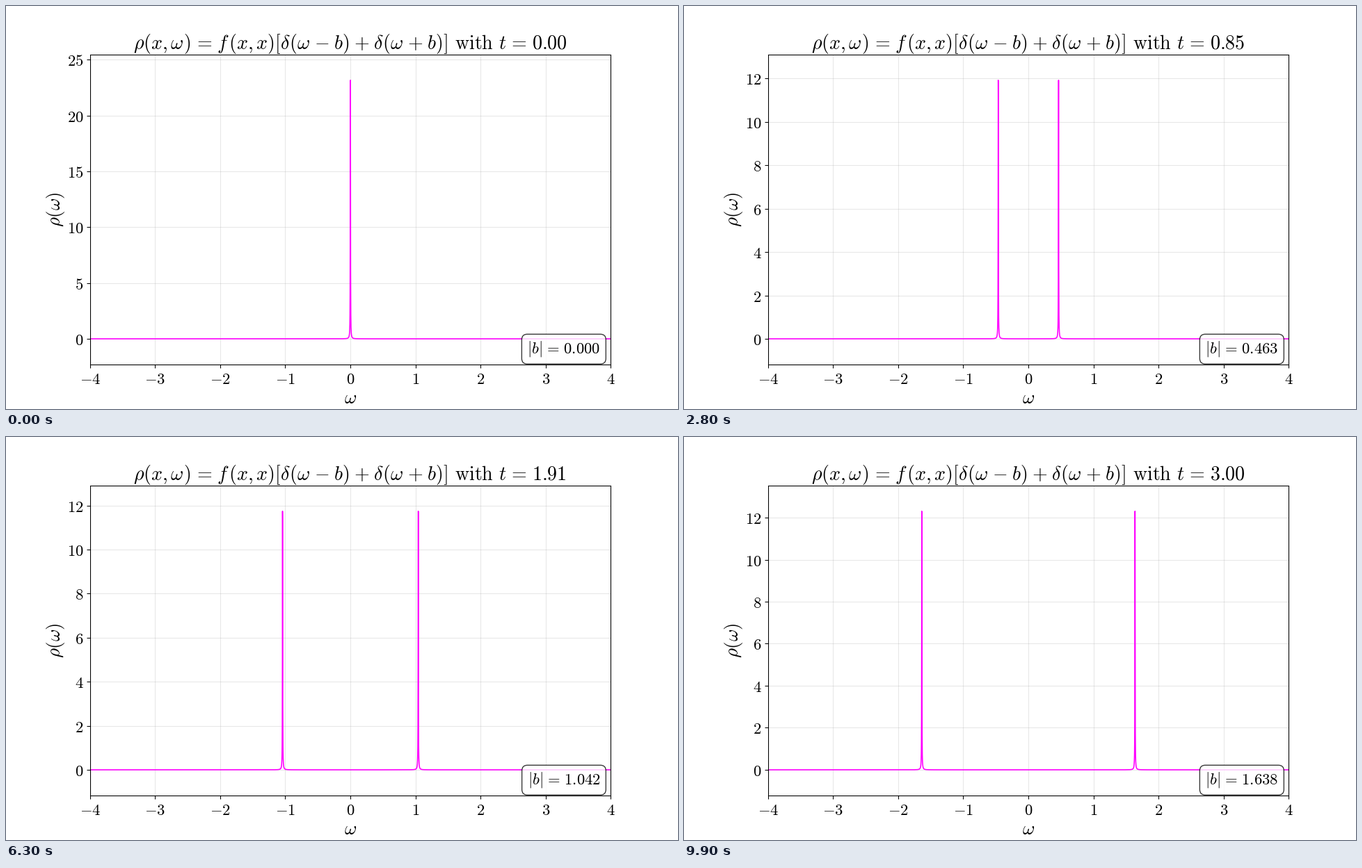
Animation of 966x580 px, one loop 10 s. Source, as a matplotlib script:

```python
import numpy as np
import matplotlib.pyplot as plt
from matplotlib.animation import FuncAnimation

W, H, DPI = 966, 580, 96
FRAMES, T_MAX = 100, 3.0
SPEED = 0.54591      # b = SPEED * t
EPS = 0.002          # half width of a broadened delta
PEAK = 12.306        # height of one delta

plt.rcParams["mathtext.fontset"] = "cm"

omega = np.linspace(-4, 4, 8000)


def lorentz(x):
    return PEAK / (1 + (x / EPS) ** 2)


def sp(width):
    return r"\hspace{%g}" % width


def rel(sym="="):
    return sp(0.116) + sym + sp(0.116)


def binary(sym):
    return sp(0.053) + sym + sp(0.053)


OM = r"\omega" + sp(0.04)
DELTA = r"\delta" + sp(0.04)
TITLE = (
    r"$\rho(x," + OM + ")" + rel() + "f" + sp(0.12) + "(x,x)["
    + DELTA + "(" + OM + binary("-") + "b)" + binary("+")
    + DELTA + "(" + OM + binary("+") + "b)]"
    + sp(0.38) + r"\mathrm{with}" + sp(0.38) + "t" + rel()
)

fig, ax = plt.subplots(figsize=(W / DPI, H / DPI), dpi=DPI)
fig.subplots_adjust(left=0.125, right=0.9, bottom=0.11, top=0.88)


def label(x, y, text, size=20, **kw):
    """Text with its baseline at pixel (x, y), y measured from the top."""
    return fig.text(x / W, 1 - y / H, text, fontsize=size, ha="center",
                    va="baseline", rotation_mode="anchor", **kw)


title = label(494.7, 61.7, "", size=21)
label(495, 572, r"$\omega$")
label(78, 292.9, r"$\rho(\omega)$", rotation=90)

line, = ax.plot([], [], color="magenta", lw=1.2)
ax.grid(alpha=0.3)
ax.set_xlim(-4, 4)
ax.tick_params(labelsize=17)
for axis in (ax.xaxis, ax.yaxis):
    axis.set_major_formatter(lambda v, pos: f"${v:g}$")

box = ax.text(0.98, 0.02, "", transform=ax.transAxes, fontsize=17,
              ha="right", va="bottom",
              bbox=dict(boxstyle="round,pad=0.35", facecolor="white",
                        alpha=0.8))


def update(i):
    t = T_MAX * i / (FRAMES - 1)
    b = SPEED * t
    rho = lorentz(omega - b) + lorentz(omega + b)
    top = rho.max()
    line.set_data(omega, rho)
    ax.set_ylim(-0.1 * top, 1.1 * top)
    title.set_text(TITLE + f"{t:.2f}$")
    box.set_text("$|b|" + rel() + f"{b:.3f}$")
    return line, title, box


anim = FuncAnimation(fig, update, frames=FRAMES, init_func=lambda: update(0),
                     interval=100, repeat=True, repeat_delay=0, blit=False)
plt.show()
```
